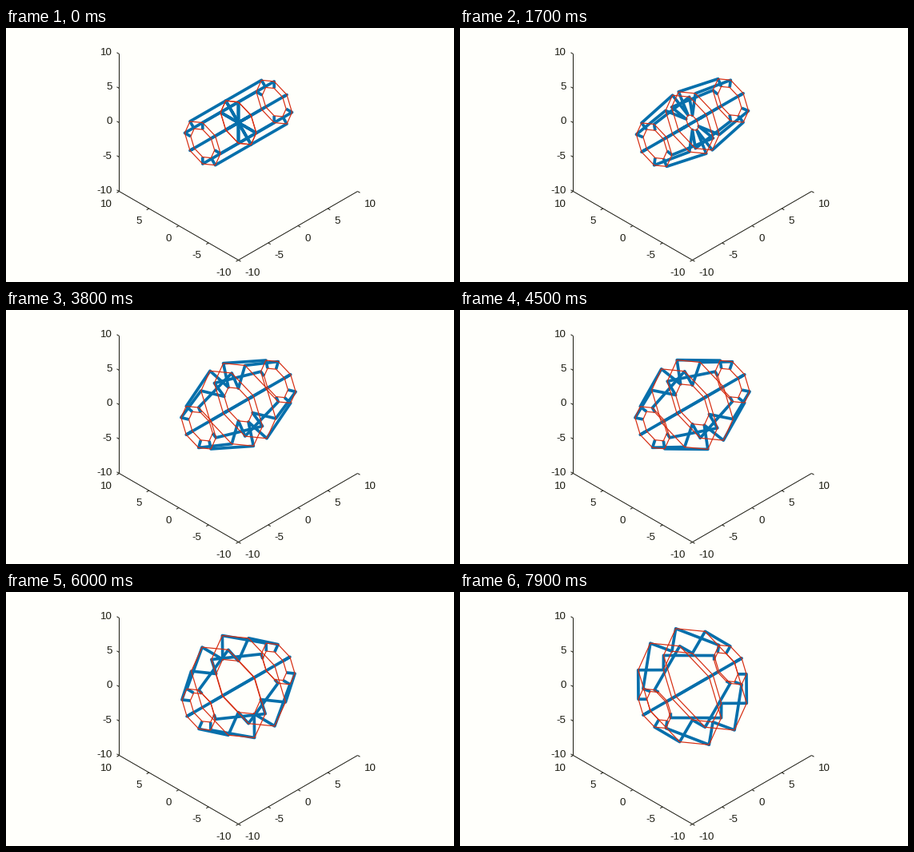
These frames come from a looping animation (560 px wide and 318 px high, 8000 ms). A matplotlib script:

```python
import numpy as np
import matplotlib.pyplot as plt
from matplotlib.animation import FuncAnimation
from matplotlib.collections import LineCollection

W, H, DPI = 560, 318, 100
FRAMES, INTERVAL = 80, 100
STEP = 0.01                      # bracket rotation per frame, radians
LEG, SPAN, LIP = 3, 6, 1         # inner leg, long bar, end lip
RIM = LEG - LIP                  # end rings keep this radius
BLUE, RED, INK, PAPER = "#066fab", "#d62c10", "#1c1c12", "#fffffb"
PX = 72 / DPI                    # one pixel in points
UNIT = 7.45                      # pixels per data unit across the stage
ANGLES = np.arange(9) * np.pi / 4


def project(x, y, z):
    """Isometric view from (-1, -1, 1) in stage pixels."""
    x, y, z = np.broadcast_arrays(x, y, z)
    return np.stack([290 + UNIT * (x - y),
                     118 - UNIT * (x + y + 2 * z) / np.sqrt(3)], axis=-1)


def profile(phi):
    """Axial position and radius of the joints along one meridian."""
    s, c = np.sin(phi), np.cos(phi)
    hub = RIM * (1 - c) + SPAN * s
    x = np.array([0, LEG * s, LEG * s + SPAN * c, (LEG - LIP) * s + SPAN * c])
    r = np.array([hub, hub + LEG * c, hub + LEG * c - SPAN * s, RIM])
    return np.r_[-x[:0:-1], x], np.r_[r[:0:-1], r]


fig = plt.figure(figsize=(W / DPI, H / DPI), dpi=DPI, facecolor=PAPER)
ax = fig.add_axes([0, 0, 1, 1])
ax.set_xlim(-0.5, W - 0.5)
ax.set_ylim(H - 0.5, -0.5)
ax.axis("off")


def line(pts):
    ax.plot(*np.transpose(pts), color=INK, lw=PX, solid_capstyle="butt")


def tick(value, at, out, shift, align):
    x, y = at
    line([(x, y), (x + out[0], y + out[1])])
    ax.text(x + shift[0], y + shift[1], str(value), ha=align, va="baseline",
            color=INK, family="Liberation Sans", size=13.33 * PX)


line(project([-10, -10, -10, 10], [10, 10, -10, -10], [10, -10, -10, -10]))
for v in range(-10, 11, 5):
    tick(v, project(-10, 10, v), (-3, -1.7), (-9, 2), "right")
    tick(v, project(-10, v, -10), (-3, 1.7), (-9, 19), "right")
    tick(v, project(v, -10, -10), (3, 1.7), (8, 19), "left")

bars = LineCollection([], colors=BLUE, linewidths=3.7 * PX, zorder=3,
                      capstyle="butt", joinstyle="round")
rings = LineCollection([], colors=RED, linewidths=1.2 * PX, zorder=4,
                       joinstyle="round")
ax.add_collection(bars)
ax.add_collection(rings)


def draw(i):
    x, r = profile(STEP * i)
    mesh = project(x[:, None], r[:, None] * np.cos(ANGLES),
                   r[:, None] * np.sin(ANGLES))
    rings.set_segments(list(mesh))
    bars.set_segments(list(mesh[:, :-1].swapaxes(0, 1)))
    return bars, rings


anim = FuncAnimation(fig, draw, frames=FRAMES, interval=INTERVAL,
                     repeat=True, repeat_delay=0, blit=False)
plt.show()
```
